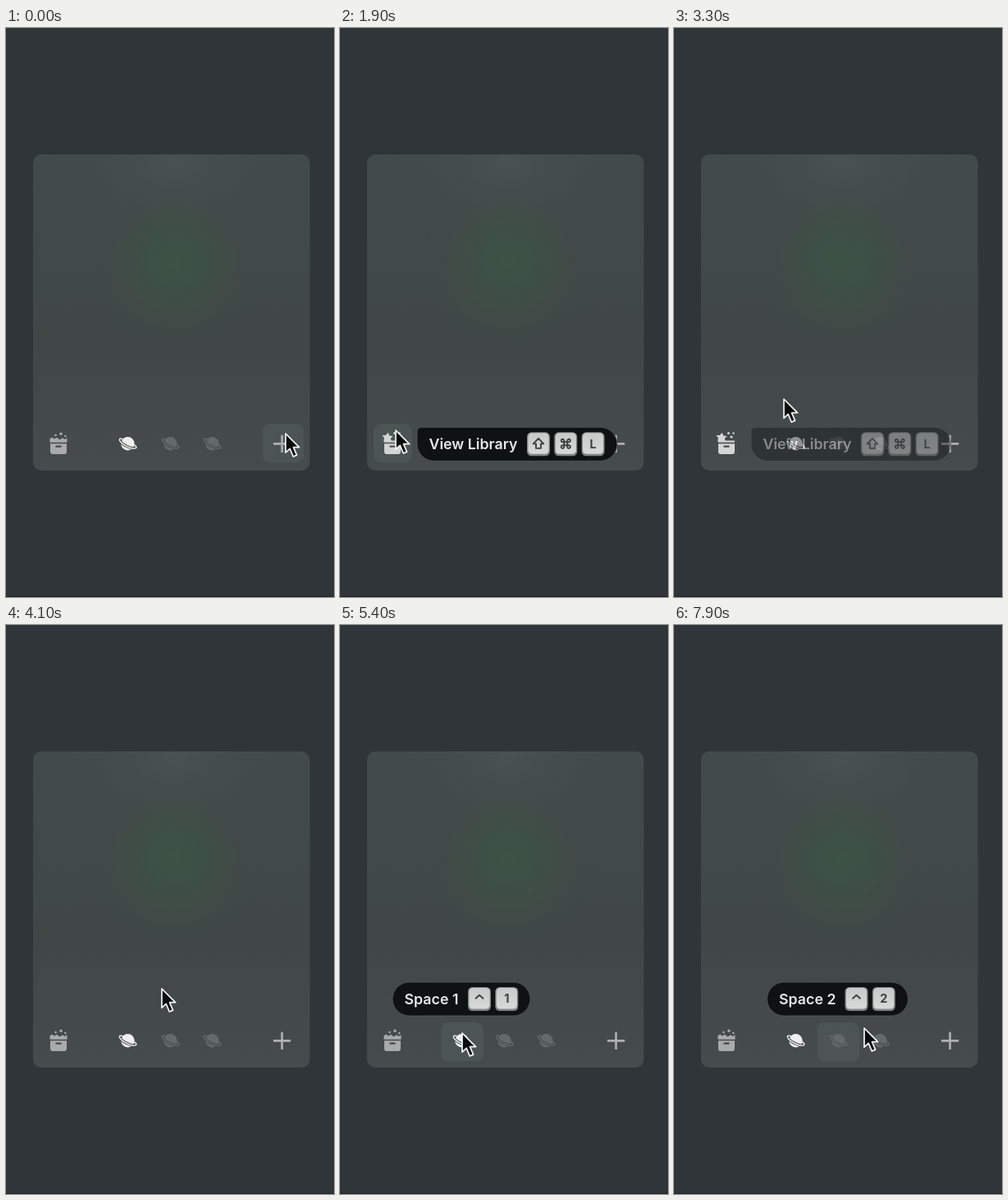
Write an HTML page that moves like this. It is 400x693 px and loops after 8 s.

```html
<!DOCTYPE html>
<html lang="en">
<head>
<meta charset="utf-8">
<title>Toolbar tooltips</title>
<style>
  html, body { margin: 0; width: 100%; height: 100%; overflow: hidden; background: #2f3538; }
  svg { display: block; width: 100%; height: 100%; }
  text { font-family: Inter, Roboto, sans-serif; font-weight: 600; }
  .label { font-size: 17.8px; fill: #e6e8e7; }
  .cap { font-size: 14.5px; font-weight: 700; fill: #3c4140; text-anchor: middle; }
</style>
</head>
<body>
<svg viewBox="0 0 400 693">
  <defs>
    <radialGradient id="green" gradientUnits="userSpaceOnUse" cx="205" cy="285" r="112">
      <stop offset="0" stop-color="#3d5445"/>
      <stop offset=".35" stop-color="#3d5145" stop-opacity=".8"/>
      <stop offset=".7" stop-color="#404c46" stop-opacity=".35"/>
      <stop offset="1" stop-color="#424948" stop-opacity="0"/>
    </radialGradient>
    <radialGradient id="sheen" gradientUnits="userSpaceOnUse" cx="205" cy="160" r="150">
      <stop offset="0" stop-color="#4a5251"/>
      <stop offset="1" stop-color="#424948" stop-opacity="0"/>
    </radialGradient>
    <linearGradient id="base" x1="0" y1="0" x2="0" y2="1">
      <stop offset="0" stop-color="#434a4b"/>
      <stop offset=".6" stop-color="#404746"/>
      <stop offset="1" stop-color="#454c4b"/>
    </linearGradient>
    <linearGradient id="key" x1="0" y1="0" x2="0" y2="1">
      <stop offset="0" stop-color="#c6cac8"/>
      <stop offset="1" stop-color="#d6d9d7"/>
    </linearGradient>
    <mask id="gap" maskUnits="userSpaceOnUse" x="-14" y="-14" width="28" height="28">
      <rect x="-14" y="-14" width="28" height="28" fill="#fff"/>
      <path d="M-11 0A11 3.4 0 0 0 11 0" transform="rotate(27)" fill="none" stroke="#000" stroke-width="3.4"/>
    </mask>
    <g id="planet">
      <circle r="8.2" mask="url(#gap)" fill="currentColor"/>
      <path d="M-7.6 -2.4C-15 -1.6 -11 3.4 0 3.4S15 -1.6 7.6 -2.4" transform="rotate(27)"
        fill="none" stroke="currentColor" stroke-width="1.4"/>
    </g>
  </defs>

  <rect width="400" height="693" fill="#2f3538"/>
  <rect y="692" width="400" height="1" fill="#1d2123"/>
  <g id="card"></g>
  <g id="spots"></g>

  <g id="library">
    <path fill-rule="evenodd" d="M54 506.3H74V516q0 3 -3 3H57q-3 0 -3 -3ZM60.5 508.6v2.2h7v-2.2Z"/>
    <g id="heap">
      <path d="M53.5 504.7V500.5l2.5 -2 3 2 3 -1.8 3.5 2.8 3.5 -2.2 2.5 1.6 3 -1.6V504.7Z"/>
      <circle cx="60.5" cy="496" r="1.3"/>
      <circle cx="67" cy="494.3" r="1.7"/>
      <circle cx="72.3" cy="497" r="1.2"/>
    </g>
    <g id="star">
      <path d="M53 503.5l1 -4 -2.5 -3.4 4.2 -.2 3 -3.2 1.6 3.7 4.4 .7 -3 3 1.2 3.4Z"/>
      <path d="M54 502.5H74V504.7H54Z"/>
      <circle cx="66.5" cy="493.5" r="1.5"/>
      <circle cx="72.5" cy="493.5" r="1.2"/>
      <circle cx="70" cy="498" r="1.6"/>
    </g>
  </g>
  <use href="#planet" x="148.5" y="506.3" color="#eef0ef"/>
  <use href="#planet" x="200.5" y="506.3" color="#646a69"/>
  <use href="#planet" x="251.5" y="506.3" color="#646a69"/>
  <path d="M326 506.4H347.2M336.6 495.8V517" stroke="#adb1b0" stroke-width="2.6"/>

  <g id="tips"></g>
  <path id="cursor" d="M0 0V23.2L5.2 18.3 9.3 28 13.6 26.1 9.5 16.7H16.6Z"
    fill="#0a0b0b" stroke="#f4f5f5" stroke-width="1.7" stroke-linejoin="round"/>
</svg>
<script>
const LOOP = 8000;
const $ = id => document.getElementById(id);

$('card').innerHTML = ['url(#base)', 'url(#sheen)', 'url(#green)'].map(fill =>
  `<rect x="33" y="154" width="337.5" height="385" rx="10" fill="${fill}"/>`).join('');

// Hover backgrounds: x, y, width, then fade in start/end and fade out start/end
const spots = [
  { x: 313, y: 482, w: 50, fade: [-200, -100, 560, 720] },
  { x: 41, y: 482, w: 47, fade: [1200, 1350, 2920, 3100] },
  { x: 123, y: 484, w: 52, fade: [4650, 4800, 7000, 7130] },
  { x: 174.5, y: 484, w: 52, fade: [7080, 7220, 7880, 8080] }
];

const glyphs = {
  shift: '<path d="M0 -6.5L6.3 .1H3V5.6H-3V.1H-6.3Z"/>',
  ctrl: '<path d="M-5 .2L0 -4.2 5 .2"/>',
  cmd: '<path d="M-2 -2H2V2H-2ZM-2 -2H-3.7A1.8 1.8 0 1 1 -2 -3.7ZM2 -2V-3.7A1.8 1.8 0 1 1 3.7 -2Z' +
       'M2 2H3.7A1.8 1.8 0 1 1 2 3.7ZM-2 2V3.7A1.8 1.8 0 1 1 -3.7 2Z"/>'
};

const tips = [
  { x: 94, y: 486.3, w: 244, corner: 5, text: 'View Library', keys: ['shift', 'cmd', 'L'],
    keyX: 134, fade: [1450, 1650, 3150, 3420] },
  { x: 64, y: 435, w: 168, corner: 20.5, text: 'Space 1', keys: ['ctrl', '1'],
    keyX: 92, fade: [4950, 5150, 7050, 7200] },
  { x: 113.5, y: 435, w: 172, corner: 20.5, text: 'Space 2', keys: ['ctrl', '2'],
    keyX: 95, fade: [7250, 7450, 8000, 8200] }
];

function keyCap(name, x) {
  const glyph = glyphs[name]
    ? `<g fill="none" stroke="#3c4140" stroke-width="1.9" stroke-linejoin="round">${glyphs[name]}</g>`
    : `<text class="cap" y="5.2">${name}</text>`;
  return `<g transform="translate(${x + 14} 20)">
    <rect x="-14" y="-14" width="28" height="29" rx="5.5" fill="#7f8582"/>
    <rect x="-12.6" y="-13" width="25.2" height="25.5" rx="4.5" fill="url(#key)"/>${glyph}</g>`;
}

function tipMarkup({ x, y, w, corner: c, text, keys, keyX }) {
  const r = 20.5, h = 41;
  const shape = `M${c} 0H${w - r}A${r} ${r} 0 0 1 ${w - r} ${h}H${r}A${r} ${r} 0 0 1 0 ${h - r}V${c}A${c} ${c} 0 0 1 ${c} 0Z`;
  return `<g transform="translate(${x} ${y})">
    <path d="${shape}" fill="#0f1213" stroke="#535a59" stroke-width=".8"/>
    <text class="label" x="14.5" y="27">${text}</text>
    ${keys.map((k, i) => keyCap(k, keyX + i * 33.3)).join('')}</g>`;
}

$('spots').innerHTML = spots.map(s =>
  `<rect x="${s.x}" y="${s.y}" width="${s.w}" height="47.5" rx="9" fill="#515857"/>`).join('');
$('tips').innerHTML = tips.map(tipMarkup).join('');

// Cursor stops: time, x, y
const path = [
  [0, 341, 494], [450, 341, 494], [1380, 68, 490], [2800, 68, 490],
  [3300, 134, 452], [3900, 190, 443], [4200, 190, 443], [4900, 149, 497],
  [6800, 149, 497], [7300, 200, 497], [7600, 203, 496], [7900, 232, 491], [8000, 242, 489]
];

const clamp = v => Math.max(0, Math.min(1, v));
const smooth = v => v * v * (3 - 2 * v);
const ramp = (t, a, b) => smooth(clamp((t - a) / (b - a)));
const fadeAt = (t, [a, b, c, d]) => ramp(t, a, b) * (1 - ramp(t, c, d));

function cursorAt(t) {
  const i = path.findIndex(p => p[0] > t);
  const [a, x0, y0] = path[i - 1], [b, x1, y1] = path[i];
  const k = ramp(t, a, b);
  return [x0 + (x1 - x0) * k, y0 + (y1 - y0) * k];
}

function draw(t) {
  $('cursor').setAttribute('transform', `translate(${cursorAt(t).join(' ')})`);
  spots.forEach((s, i) => $('spots').children[i].setAttribute('opacity', fadeAt(t, s.fade) * 0.75));
  tips.forEach((tip, i) => $('tips').children[i].setAttribute('opacity', fadeAt(t, tip.fade)));
  const lift = fadeAt(t, [1200, 1400, 3300, 3600]);
  const tone = Math.round(168 + 42 * lift);
  $('library').setAttribute('fill', `rgb(${tone},${tone + 3},${tone + 2})`);
  $('heap').setAttribute('opacity', 1 - lift);
  $('star').setAttribute('opacity', lift);
}

const start = performance.now();
function tick() {
  draw((performance.now() - start) % LOOP);
  requestAnimationFrame(tick);
}
draw(0);
requestAnimationFrame(tick);
</script>
</body>
</html>
```
